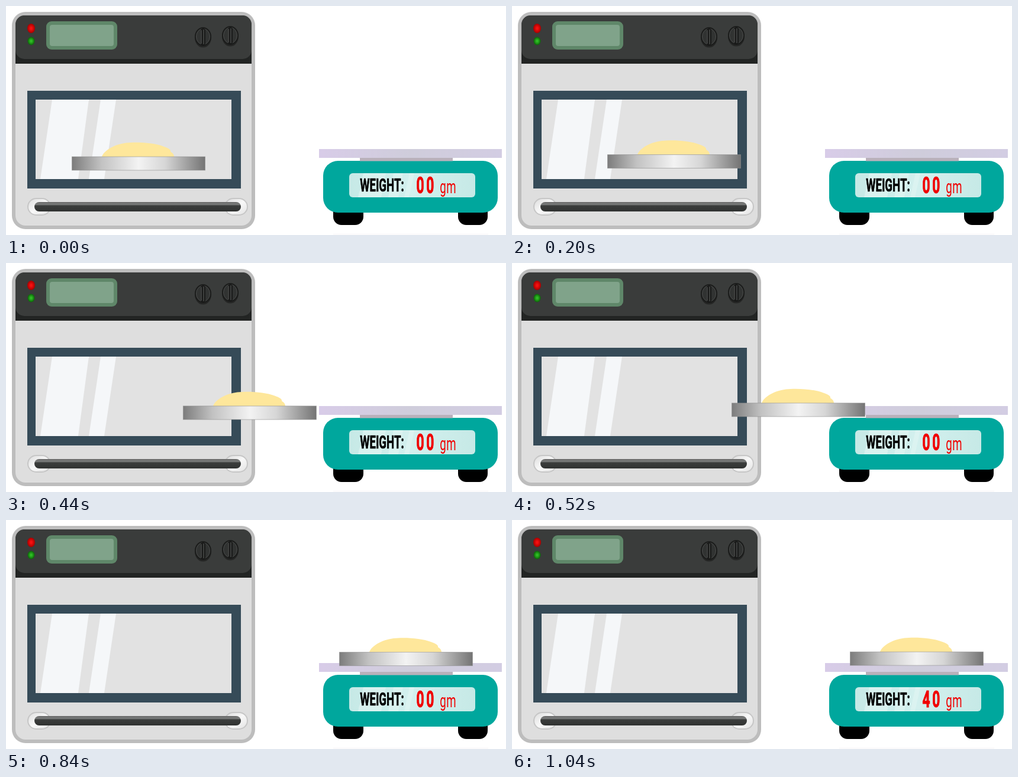
These frames come from a looping animation (845 by 389 pixels, 1080 ms). An HTML page:

```html
<!DOCTYPE html>
<html lang="en">
<head>
<meta charset="utf-8">
<title>Weighing a dried sample</title>
<style>
  html, body { margin: 0; width: 100%; height: 100%; overflow: hidden; background: #fff; }
  svg { display: block; width: 845px; height: 389px; }
  text { font-family: Roboto, "Liberation Sans", sans-serif; }
</style>
</head>
<body>
<svg viewBox="0 0 845 389">
  <defs>
    <linearGradient id="steel">
      <stop offset="0" stop-color="#7c7c7c"/>
      <stop offset=".22" stop-color="#c2c2c2"/>
      <stop offset=".5" stop-color="#f3f3f3"/>
      <stop offset=".7" stop-color="#d6d6d6"/>
      <stop offset="1" stop-color="#747474"/>
    </linearGradient>
    <linearGradient id="bar" x2="0" y2="1">
      <stop offset="0" stop-color="#666"/>
      <stop offset=".25" stop-color="#7d7f7e"/>
      <stop offset=".4" stop-color="#3b3d3c"/>
      <stop offset="1" stop-color="#303231"/>
    </linearGradient>
    <linearGradient id="bracket" x2="1" y2="1">
      <stop offset="0" stop-color="#dcdcdc"/>
      <stop offset=".5" stop-color="#f8f8f8"/>
      <stop offset="1" stop-color="#e2e2e2"/>
    </linearGradient>
    <linearGradient id="glass">
      <stop offset="0" stop-color="#c6e9e6"/>
      <stop offset=".5" stop-color="#d3f0ee"/>
      <stop offset="1" stop-color="#c6e9e6"/>
    </linearGradient>
    <linearGradient id="tray">
      <stop offset="0" stop-color="#d8cce8"/>
      <stop offset=".5" stop-color="#cfcddb"/>
      <stop offset="1" stop-color="#d3cde3"/>
    </linearGradient>
    <radialGradient id="red"><stop offset=".2" stop-color="#f51010"/><stop offset="1" stop-color="#a80000"/></radialGradient>
    <radialGradient id="green"><stop offset=".2" stop-color="#2fbd24"/><stop offset="1" stop-color="#0b6508"/></radialGradient>
    <g id="knob">
      <ellipse cy="2" rx="14" ry="16.5" fill="#252625"/>
      <ellipse rx="14" ry="16" fill="#1b1c1b"/>
      <ellipse rx="11.5" ry="13.5" fill="#313332" stroke="#4c4e4d"/>
      <rect x="-4" y="-14" width="8" height="29" rx="4" fill="#191a19"/>
      <path d="M-3-11V12M1-12V13" stroke="#565857" stroke-width="1.2"/>
    </g>
    <rect id="bracketShape" y="327" width="38" height="28" rx="14" fill="url(#bracket)" stroke="#c6c6c6" stroke-width="2"/>
  </defs>

  <!-- oven -->
  <rect x="10" y="10" width="411" height="369" rx="23" fill="#bdbdbd"/>
  <rect x="16" y="16" width="399" height="357" rx="17" fill="#dedede"/>
  <path d="M16 98V33a17 17 0 0 1 17-17H398a17 17 0 0 1 17 17V98Z" fill="#222423"/>
  <rect x="16" y="16" width="399" height="74" rx="15" fill="#3a3c3b"/>
  <ellipse cx="42.500" cy="38" rx="6.500" ry="8" fill="url(#red)"/>
  <ellipse cx="42.500" cy="59.500" rx="6" ry="7" fill="url(#green)"/>
  <rect x="68" y="26" width="120" height="48" rx="9" fill="#5f8769"/>
  <rect x="74" y="32" width="108" height="36" rx="4" fill="#80a38a"/>
  <use href="#knob" x="333" y="52"/>
  <use href="#knob" x="379" y="50"/>
  <rect x="36" y="144" width="361" height="166" fill="#364b58"/>
  <rect x="50" y="159" width="331" height="135" fill="#e2e2e2"/>
  <path d="M78 159H140L122 294H58ZM160 159H186L166 294H140Z" fill="#f5f7f9"/>
  <use href="#bracketShape" x="37"/>
  <use href="#bracketShape" x="370"/>
  <rect x="48" y="333" width="349" height="16" rx="8" fill="url(#bar)"/>

  <!-- scale -->
  <path d="M553 387.500H815" stroke="#f7f5f6"/>
  <path d="M553 340H604V358a14 14 0 0 1-14 14H567a14 14 0 0 1-14-14ZM764 340H814V358a14 14 0 0 1-14 14H778a14 14 0 0 1-14-14Z"/>
  <rect x="536" y="263" width="295" height="88" rx="25" fill="#00a79d"/>
  <rect x="598" y="256" width="157" height="7.500" fill="#b9b1bb"/>
  <rect x="529" y="243" width="309" height="15" fill="url(#tray)"/>
  <rect x="580" y="284" width="213" height="41" rx="6" fill="url(#glass)"/>
  <path d="M604 284H642L634 325H595ZM655 284H671L663 325H646ZM682 284H690L681 325H673Z" fill="#e0f5f3" opacity=".7"/>
  <!-- condensed lettering -->
  <g transform="scale(.6 1)">
    <text x="997" y="315.500" font-size="31" font-weight="700" stroke="#000" stroke-width=".7">WEIGHT:</text>
    <g fill="#f00000">
      <text id="reading" x="1156" y="318" font-size="38" font-weight="700" letter-spacing="6" stroke="#f00000">00</text>
      <text x="1222" y="318" font-size="31" letter-spacing="1">gm</text>
    </g>
  </g>

  <!-- dish with sample -->
  <g id="dish">
    <path d="M51 .5C54-9 70-20 92-23C112-25 140-23 155-17C164-14 168-11 167-8C171-6 173-3 173 .5Z" fill="#fee79b"/>
    <rect x=".5" y=".5" width="225" height="23" fill="url(#steel)" stroke="#8c8c8c" stroke-opacity=".6"/>
  </g>
</svg>
<script>
  const LOOP = 1080, STEP = 40;
  const START = { x: 111, y: 255.5 }, END = { x: 571, y: 223.5 };
  const dish = document.getElementById("dish");
  const reading = document.getElementById("reading");

  // [time in ms, dish x, speed in px per step]
  const keys = [
    [0, 111, 7], [200, 161, 13], [320, 212, 22], [520, 371, 37],
    [560, 408, 36], [680, 501, 26], [840, 563, 4], [1040, 571, 0]
  ];

  function dishX(t) {
    if (t >= 1040) return END.x;
    const i = keys.findIndex(key => key[0] > t);
    const [t0, x0, v0] = keys[i - 1], [t1, x1, v1] = keys[i];
    const u = (t - t0) / (t1 - t0), steps = (t1 - t0) / STEP;
    const blend = u * u * (3 - 2 * u);
    return x0 + (x1 - x0) * blend
      + steps * u * (1 - u) * (v0 * (1 - u) - v1 * u);
  }

  function draw(time) {
    const t = Math.floor((time % LOOP) / STEP) * STEP;
    const x = dishX(t);
    const y = START.y + (END.y - START.y) * (x - START.x) / (END.x - START.x);
    dish.setAttribute("transform", `translate(${x} ${y})`);
    reading.textContent = t >= 1040 ? "40" : "00";
  }

  const begin = performance.now();
  function tick() {
    draw(performance.now() - begin);
    requestAnimationFrame(tick);
  }
  tick();
</script>
</body>
</html>
```
